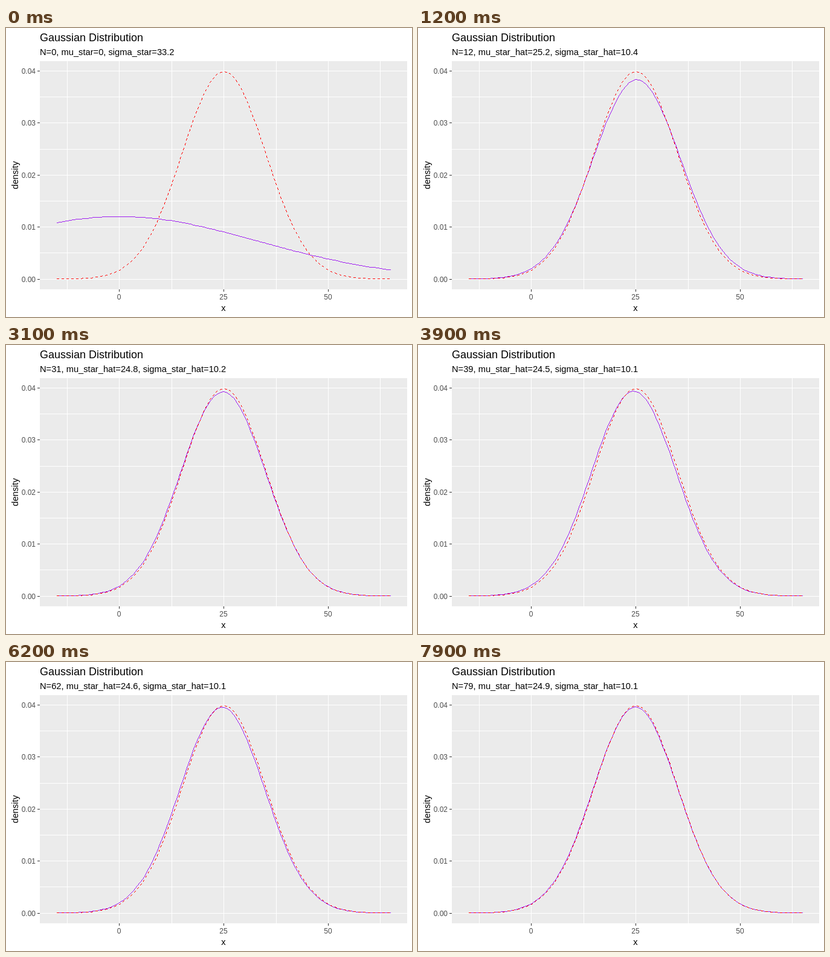
These frames come from a looping animation (672 by 480 pixels, 8000 ms). An HTML page:

```html
<!DOCTYPE html>
<html lang="en">
<head>
<meta charset="utf-8">
<title>Gaussian Distribution</title>
<style>
  html, body { margin: 0; width: 100%; height: 100%; overflow: hidden; background: #fff; }
  svg { display: block; font-family: "Liberation Sans", Arial, sans-serif; }
  path, rect { shape-rendering: crispEdges; fill: none; stroke-width: 1; }
  .panel { fill: #ebebeb; }
  .grid { stroke: #fff; }
  .ticks { stroke: #333; }
  .estimate { fill: #a020f0; }
  .truth { fill: #f00; }
  .title { font-size: 18px; }
  .label { font-size: 14.7px; }
  .tick { font-size: 12px; fill: #4d4d4d; }
  .mid { text-anchor: middle; }
  .end { text-anchor: end; }
</style>
</head>
<body>
<svg id="plot" width="672" height="480" viewBox="0 0 672 480">
  <rect class="panel" x="56" y="55" width="608" height="379"/>
  <path class="grid" id="grid"/>
  <path class="ticks" id="ticks"/>
  <path class="estimate" id="estimate"/>
  <path class="truth" id="truth"/>
  <text class="title" x="56" y="22">Gaussian Distribution</text>
  <text class="label" id="subtitle" x="56" y="45"></text>
  <text class="label mid" x="360" y="470">x</text>
  <text class="label mid" transform="translate(20 244.5) rotate(-90)">density</text>
</svg>
<script>
const LOOP = 8000, STEP = 100;
const TRUE_MU = 25, SIGMA = 10, PRIOR_VAR = 1000;
const LEFT = 56, RIGHT = 664, TOP = 55, BOTTOM = 434;

// Posterior mean after the given number of observations
const MEANS = [[12, 25.2], [23, 25.1], [39, 24.5], [49, 24.7], [62, 24.6], [79, 24.9]];

const $ = id => document.getElementById(id);
const px = x => Math.round(187.46 + x * 6.911);
const py = d => Math.round(416.6 - d * 8638);
const round1 = v => Math.round(v * 10) / 10;

function density(x, mu, sigma) {
  const z = (x - mu) / sigma;
  return Math.exp(-z * z / 2) / (sigma * Math.sqrt(2 * Math.PI));
}

function curve(mu, sigma) {
  const points = [];
  for (let i = 0; i <= 100; i++) {
    const x = -15 + 0.8 * i;
    points.push([px(x), py(density(x, mu, sigma))]);
  }
  return points;
}

// Hard-edged line through the points, one pixel wide; dash 0 means solid
function pixelLine(points, dash = 0) {
  let d = "", length = 0;
  for (let i = 1; i < points.length; i++) {
    const [x, y] = points[i - 1];
    const dx = points[i][0] - x, dy = points[i][1] - y;
    const steps = Math.max(Math.abs(dx), Math.abs(dy));
    for (let s = 0; s < steps; s++) {
      if (!dash || length % (2 * dash) < dash) {
        d += `M${Math.round(x + dx * s / steps)} ${Math.round(y + dy * s / steps)}h1v1h-1z`;
      }
      length += Math.hypot(dx, dy) / steps;
    }
  }
  return d;
}

// Weight of the data against a prior centred on zero
const weight = n => n / (n + SIGMA * SIGMA / PRIOR_VAR);

function meanAt(n) {
  const [n0, m0] = MEANS[0];
  if (n <= n0) return m0 / weight(n0) * weight(n);
  const i = MEANS.findIndex(([k]) => k >= n);
  const [a, ma] = MEANS[i - 1], [b, mb] = MEANS[i];
  return ma + (mb - ma) * (n - a) / (b - a);
}

const sigmaAt = n => Math.sqrt(SIGMA ** 2 + 1 / (1 / PRIOR_VAR + n / SIGMA ** 2));

function addText(text, x, y, cls) {
  const el = document.createElementNS("http://www.w3.org/2000/svg", "text");
  el.setAttribute("x", x);
  el.setAttribute("y", y);
  el.setAttribute("class", cls);
  el.textContent = text;
  $("plot").append(el);
}

function drawAxes() {
  let grid = "", ticks = "";
  for (let x = -12.5; x < 65; x += 12.5) grid += `M${px(x) + 0.5} ${TOP}V${BOTTOM}`;
  for (let i = 0; i <= 8; i++) grid += `M${LEFT} ${py(i * 0.005) + 0.5}H${RIGHT}`;
  for (const x of [0, 25, 50]) {
    ticks += `M${px(x) + 0.5} ${BOTTOM}v4`;
    addText(x, px(x), 451, "tick mid");
  }
  for (let i = 0; i <= 4; i++) {
    const y = py(i / 100);
    ticks += `M${LEFT - 4} ${y + 0.5}h4`;
    addText((i / 100).toFixed(2), 49, y + 5, "tick end");
  }
  $("grid").setAttribute("d", grid);
  $("ticks").setAttribute("d", ticks);
}

let shown = -1;
function draw(n) {
  const mu = meanAt(n), sigma = sigmaAt(n), hat = n ? "_hat" : "";
  $("estimate").setAttribute("d", pixelLine(curve(mu, sigma)));
  $("subtitle").textContent =
    `N=${n}, mu_star${hat}=${round1(mu)}, sigma_star${hat}=${round1(sigma)}`;
  shown = n;
}

function tick() {
  const n = Math.floor(performance.now() % LOOP / STEP);
  if (n !== shown) draw(n);
  requestAnimationFrame(tick);
}

drawAxes();
$("truth").setAttribute("d", pixelLine(curve(TRUE_MU, SIGMA), 4));
draw(0);
requestAnimationFrame(tick);
</script>
</body>
</html>
```
